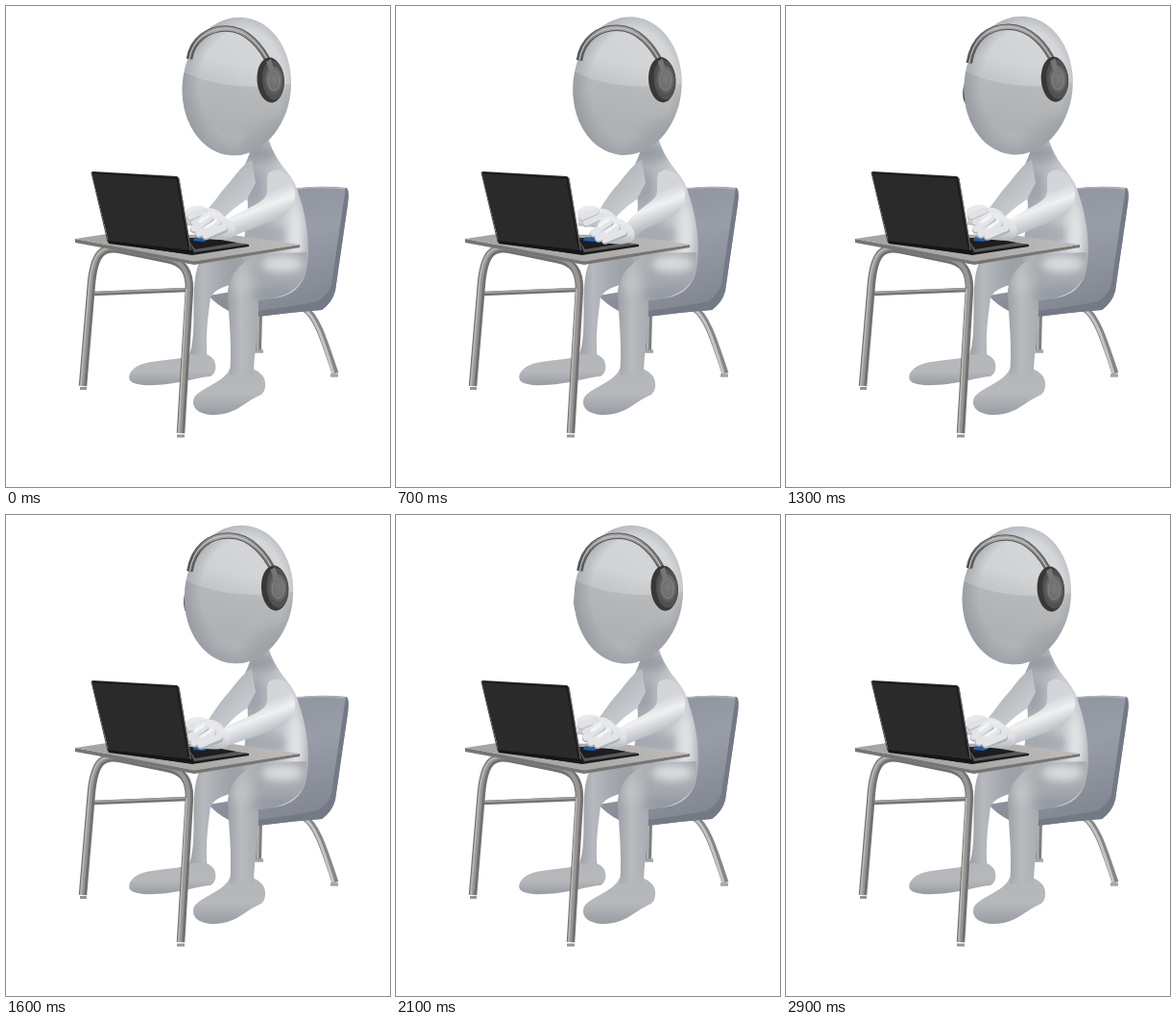
Write an HTML page that moves like this. It is 400x500 px and loops after 3 s.

```html
<!DOCTYPE html>
<html lang="en">
<head>
<meta charset="utf-8">
<title>Typing at a desk</title>
<style>
html, body { margin: 0; width: 100%; height: 100%; overflow: hidden; background: #fff; }
svg { display: block; width: 100%; height: 100%; }
.tube path { fill: none; stroke-linejoin: round; }
.soft { filter: url(#soft); }
.finger path { fill: none; stroke-linecap: round; }
</style>
</head>
<body>
<svg viewBox="0 0 400 500">
<defs>
  <filter id="soft" x="-50%" y="-50%" width="200%" height="200%"><feGaussianBlur stdDeviation="5"/></filter>
  <linearGradient id="skullFill" x1=".55" y1="0" x2=".45" y2="1">
    <stop offset="0" stop-color="#d9dbde"/><stop offset=".35" stop-color="#cbcdcf"/>
    <stop offset=".5" stop-color="#b6b8ba"/><stop offset=".8" stop-color="#aeb0b2"/><stop offset="1" stop-color="#b7babe"/>
  </linearGradient>
  <radialGradient id="rimFill" cx=".54" cy=".48" r=".54">
    <stop offset=".72" stop-color="#8b9199" stop-opacity="0"/><stop offset="1" stop-color="#8b9199" stop-opacity=".65"/>
  </radialGradient>
  <linearGradient id="crownFill" x1="0" y1="0" x2="0" y2="1">
    <stop offset=".3" stop-color="#fff" stop-opacity="0"/><stop offset="1" stop-color="#fff" stop-opacity=".22"/>
  </linearGradient>
  <linearGradient id="chairFill" x1="0" y1="0" x2=".3" y2="1">
    <stop offset="0" stop-color="#8c919c"/><stop offset=".5" stop-color="#989da8"/><stop offset="1" stop-color="#838893"/>
  </linearGradient>
  <linearGradient id="torsoFill" x1="0" y1="0" x2="1" y2="0">
    <stop offset="0" stop-color="#a5a9b0"/><stop offset=".4" stop-color="#b9bcc1"/>
    <stop offset=".8" stop-color="#d2d4d8"/><stop offset="1" stop-color="#b3b6bb"/>
  </linearGradient>
  <linearGradient id="shinFill" gradientUnits="userSpaceOnUse" x1="231" y1="0" x2="266" y2="0">
    <stop offset="0" stop-color="#9da0a5"/><stop offset=".4" stop-color="#b9bbbe"/><stop offset="1" stop-color="#a5a9ae"/>
  </linearGradient>
  <linearGradient id="farShinFill" gradientUnits="userSpaceOnUse" x1="193" y1="0" x2="234" y2="0">
    <stop offset="0" stop-color="#a0a3a8"/><stop offset=".3" stop-color="#b6b9bd"/><stop offset="1" stop-color="#9da1a8"/>
  </linearGradient>
  <linearGradient id="shoeFill" x1="0" y1="0" x2="0" y2="1">
    <stop offset="0" stop-color="#b4b7ba"/><stop offset=".55" stop-color="#b6b8bb"/><stop offset="1" stop-color="#989ca3"/>
  </linearGradient>
  <linearGradient id="farArmFill" x1="0" y1="0" x2=".7" y2="1">
    <stop offset="0" stop-color="#a3a8af"/><stop offset=".5" stop-color="#b9bdc2"/><stop offset="1" stop-color="#cfd2d6"/>
  </linearGradient>
  <linearGradient id="armFill" gradientUnits="userSpaceOnUse" x1="260" y1="198" x2="272" y2="229">
    <stop offset="0" stop-color="#d3d5d9"/><stop offset=".4" stop-color="#f0f1f2"/><stop offset="1" stop-color="#b2b6bd"/>
  </linearGradient>
  <linearGradient id="handFill" x1="0" y1="0" x2="0" y2="1">
    <stop offset="0" stop-color="#ececee"/><stop offset=".6" stop-color="#dfe1e3"/><stop offset="1" stop-color="#b3b7bd"/>
  </linearGradient>
  <linearGradient id="deskFill" x1="0" y1="0" x2="1" y2="0">
    <stop offset="0" stop-color="#a6a4a3"/><stop offset=".6" stop-color="#adabaa"/><stop offset="1" stop-color="#c0bebd"/>
  </linearGradient>
  <linearGradient id="metalFill" x1="0" y1="0" x2="1" y2="0">
    <stop offset="0" stop-color="#555"/><stop offset=".3" stop-color="#a4a4a4"/>
    <stop offset=".6" stop-color="#a0a0a0"/><stop offset="1" stop-color="#6e6e6e"/>
  </linearGradient>
  <radialGradient id="padFill" cx=".55" cy=".45" r=".6">
    <stop offset="0" stop-color="#7b7b7a"/><stop offset=".65" stop-color="#6a6a69"/><stop offset="1" stop-color="#4b4b4b"/>
  </radialGradient>
  <path id="body" d="M256 132C258 156 247 162 246 176C249 190 254 200 251 218L246 262L262 302C284 308 306 299 312 278C318 254 314 222 305 196C300 172 279 166 272 132Z"/>
  <clipPath id="inBody"><use href="#body"/></clipPath>
  <path id="leg" d="M313 256C317 286 301 303 263 306C264 335 258 360 258 384L233 384C236 355 232 325 231 300C231 283 240 268 264 258Z"/>
  <clipPath id="inLeg"><use href="#leg"/></clipPath>
  <ellipse id="egg" cx="240.300" cy="83.500" rx="56.500" ry="72" transform="rotate(6 240.300 83.500)"/>
  <clipPath id="inEgg"><use href="#egg"/></clipPath>
</defs>

<!-- chair -->
<g class="tube">
  <path d="M264 318L263 358" stroke="#7d7f80" stroke-width="6"/>
  <path d="M263 318L262 357" stroke="#b2b3b4" stroke-width="2"/>
  <path d="M310 314C323 321 331 346 343 382" stroke="#858687" stroke-width="7"/>
  <path d="M309 314C322 321 330 346 341 382" stroke="#c3c4c5" stroke-width="3"/>
  <path d="M259 359H268M338 384H346" stroke="#a5a5a5" stroke-width="3.500"/>
</g>
<path d="M299 190Q328 186 355 189Q358 191 356 206L343 296Q340 308 329 316Q300 318 262 323L232 317Q220 311 211 301L300 286Z" fill="url(#chairFill)"/>
<path d="M354 189Q358 191 356 206L343 296Q340 308 329 316Q300 318 262 323L232 317L262 317Q307 311 325 307Q336 300 339 290L351 208Z" fill="#737985"/>
<path d="M301 190Q328 187 353 190" fill="none" stroke="#b0b4bb" stroke-width="1.500"/>

<!-- far leg -->
<path d="M260 252L204 262C192 278 197 318 195 340C194 354 192 362 188 368L210 370C207 342 211 320 213 303C217 296 224 292 234 290L260 290Z" fill="url(#farShinFill)"/>
<path d="M191 362C184 368 166 367 146 371C132 374 126 383 129 389C133 395 152 395 168 393C186 391 199 386 213 385C219 382 220 373 216 367C212 362 207 361 203 362Z" fill="url(#shoeFill)"/>

<!-- torso and near leg -->
<use href="#body" fill="url(#torsoFill)"/>
<g clip-path="url(#inBody)">
  <ellipse class="soft" cx="264" cy="153" rx="20" ry="9" fill="#8f949c" opacity=".75"/>
  <ellipse class="soft" cx="258" cy="188" rx="10" ry="17" fill="#9a9fa8" opacity=".8"/>
  <ellipse class="soft" cx="270" cy="238" rx="24" ry="11" fill="#a3a7ae" opacity=".8"/>
  <ellipse class="soft" cx="302" cy="236" rx="7" ry="28" fill="#e2e3e5"/>
</g>
<path d="M233 377C228 391 202 397 196 407C192 417 200 425 217 425C240 425 250 410 266 404C272 399 271 387 266 383Q262 379 257 377Z" fill="url(#shoeFill)"/>
<use href="#leg" fill="url(#shinFill)"/>
<g clip-path="url(#inLeg)">
  <ellipse class="soft" cx="288" cy="301" rx="30" ry="9" fill="#949aa3"/>
  <ellipse class="soft" cx="288" cy="268" rx="22" ry="9" fill="#d9dbdd"/>
  <ellipse class="soft" cx="245" cy="288" rx="8" ry="12" fill="#c0c2c5"/>
  <ellipse class="soft" cx="246" cy="385" rx="14" ry="6" fill="#b4b7ba"/>
</g>

<!-- desk -->
<g class="tube">
  <path d="M91 299L189 295" stroke="#737270" stroke-width="4.500"/>
  <path d="M91 298L189 294" stroke="#a09f9d" stroke-width="1.800"/>
  <path d="M80 395L89 288C92 258 100 249 119 253L168 263C185 266 191 276 191 294L182 444" stroke="#72716f" stroke-width="8.500"/>
  <path d="M79 395L88 288C91 258 99 248 119 252L168 262C184 265 190 276 190 294L181 444" stroke="#989795" stroke-width="4.500"/>
  <path d="M78 395L87 288C90 259 98 247 119 252M188 294L180 444" stroke="#bab9b7" stroke-width="1.500"/>
  <path d="M77 397.500H84M178 447H186" stroke="#969694" stroke-width="3"/>
</g>
<path d="M72 242L196 265L306 248V251L196 269L72 246Z" fill="#777573"/>
<path d="M72 242L105 237L236 238L306 248L196 265.500Z" fill="url(#deskFill)"/>
<path d="M106 243L194 241L253 248V250L194 259L107 246Z" fill="#1c1c1d"/>
<path d="M190 243L206 240L252 248L196 256Z" fill="#5a5a5b"/>
<path d="M190 243L206 240L240 246L197 253Z" fill="#1d1d1f"/>
<path d="M197 240L212 242L206 245L195 244Z" fill="#245ea8"/>

<!-- arms and hands -->
<path id="farArm" fill="url(#farArmFill)"/>
<g id="farHand" class="finger">
  <path d="M187 212C195 206 203 206 210 210C219 210 225 214 228 221C224 228 211 231 200 229L188 228Z" style="fill:url(#handFill)"/>
  <path d="M206 214L192 220M212 219L196 226" stroke="#b7bbc2" stroke-width="7"/>
  <path d="M206 213L192 219M212 218L196 225" stroke="#e0e2e4" stroke-width="6"/>
</g>
<path id="nearArm" fill="url(#armFill)"/>
<g id="nearHand" class="finger">
  <path d="M204 217C211 211 222 215 229 220C239 225 241 236 236 240C228 245 212 243 202 240C196 236 198 223 204 217Z" style="fill:url(#handFill)"/>
  <path d="M212 222L196 232M220 226L201 237M227 232L208 239" stroke="#aeb3bb" stroke-width="8.500"/>
  <path d="M212 220L196 231M220 225L201 236M227 230L208 238" stroke="#e3e4e7" stroke-width="7"/>
  <path d="M211 218L202 224M219 223L209 230" stroke="#f4f5f6" stroke-width="3"/>
</g>

<!-- laptop lid -->
<path d="M89 173Q89 172 91 172L178 177Q180 178 180.500 180L193 255L107 246Z" fill="#2a2a2a"/>
<path d="M91 173.500L178 179L190 251" fill="none" stroke="#1b1b1b" stroke-width="1.500"/>
<path d="M180 179L192.500 254" stroke="#696969" stroke-width="1"/>
<path d="M89 173L106 245" stroke="#4c4c4c" stroke-width="1"/>
<path d="M106 244L193 254L195 258.500L107 247Z" fill="#151515"/>

<!-- head -->
<g id="head">
  <ellipse id="farCup" cx="191" cy="91.500" rx="4" ry="11.500" fill="#333"/>
  <use href="#egg" fill="url(#skullFill)"/>
  <use href="#egg" fill="url(#rimFill)"/>
  <g clip-path="url(#inEgg)">
    <path d="M180 66Q228 92 302 80V10H180Z" fill="url(#crownFill)"/>
    <ellipse class="soft" cx="266" cy="135" rx="26" ry="10" fill="#999da3" opacity=".5" transform="rotate(-42 266 135)"/>
  </g>
  <path id="bandEdge" fill="none" stroke="#565656" stroke-width="6.500"/>
  <path id="band" fill="none" stroke="url(#metalFill)" stroke-width="4.500"/>
  <path id="bandShine" fill="none" stroke="#c2c2c2" stroke-width="1.200"/>
  <g id="cup">
    <ellipse cx="275.500" cy="77" rx="14" ry="23.500" fill="#383838" transform="rotate(-4 275.500 77)"/>
    <ellipse cx="278.500" cy="77" rx="11.500" ry="20.500" fill="#515151" transform="rotate(-4 278.500 77)"/>
    <ellipse cx="278.500" cy="77.500" rx="9.500" ry="15" fill="url(#padFill)"/>
    <ellipse cx="279" cy="77.500" rx="6" ry="10" fill="none" stroke="#858585" stroke-width="1"/>
    <path d="M271 58L276 55L280 68L275 70Z" fill="#757575"/>
  </g>
</g>
</svg>
<script>
const LOOP = 3000, STEP = 100;
const $ = id => document.getElementById(id);

// pose values at each key time
const times = [0, 700, 1300, 1600, 2100, 2500, 2900, LOOP];
const pose = {
  turn: [0, .35, 1, .9, .8, .45, .05, 0],
  lean: [0, .3, .8, 1, .9, .4, 0, 0],
  reachX: [0, 10, 2, -5, 2, 1, 0, 0],
  reachY: [0, 4, 0, 1, 0, 0, 0, 0],
  farX: [0, 2, 1, 0, 1, 1, 0, 0],
  farY: [0, 1, 0, 2, 0, 1, 0, 0]
};

function at(track, t) {
  const i = times.findIndex(k => k > t);
  const u = (t - times[i - 1]) / (times[i] - times[i - 1]);
  return track[i - 1] + (track[i] - track[i - 1]) * u * u * (3 - 2 * u);
}

const move = (id, x, y) => $(id).setAttribute('transform', `translate(${x} ${y})`);
const shape = (id, d) => $(id).setAttribute('d', d);

function draw(t) {
  const turn = at(pose.turn, t), lean = at(pose.lean, t);
  const tap = Math.sin(t / 600 * 2 * Math.PI) * .7;
  const nx = at(pose.reachX, t), ny = at(pose.reachY, t) + tap;
  const fx = at(pose.farX, t), fy = at(pose.farY, t) - tap;

  move('head', 2.2 * lean, -lean);
  move('cup', 2.5 * turn, 0);
  move('farCup', -4.5 * turn, 0);
  const arc = `M${191 - 2 * turn} ${55 + 5 * turn}C${194 - turn} 35 ${211 - 2 * turn} ${23 - turn} ${230 + turn} ${23.5 - turn}` +
    `C${251 + 2 * turn} ${24 - turn} ${266 + 3 * turn} 42 ${275 + 2.5 * turn} 61`;
  for (const id of ['bandEdge', 'band', 'bandShine']) shape(id, arc);

  move('nearHand', nx, ny);
  move('farHand', fx, fy);
  shape('farArm', `M256 160C245 165 236 181 227 190C222 196 217 204 ${211 + fx} ${210 + fy}` +
    `L${226 + fx} ${221 + fy}C236 211 245 205 251 201L260 184Z`);
  shape('nearArm', `M273 174C284 165 296 175 300 190C304 203 297 214 286 220C271 227 256 231 ${237 + nx} ${239 + ny}` +
    `L${230 + nx} ${222 + ny}C${244 + nx / 2} 213 261 208 269 200C275 193 270 184 273 174Z`);
}

function tick() {
  draw(Math.floor(performance.now() / STEP) * STEP % LOOP);
  requestAnimationFrame(tick);
}
tick();
</script>
</body>
</html>
```
